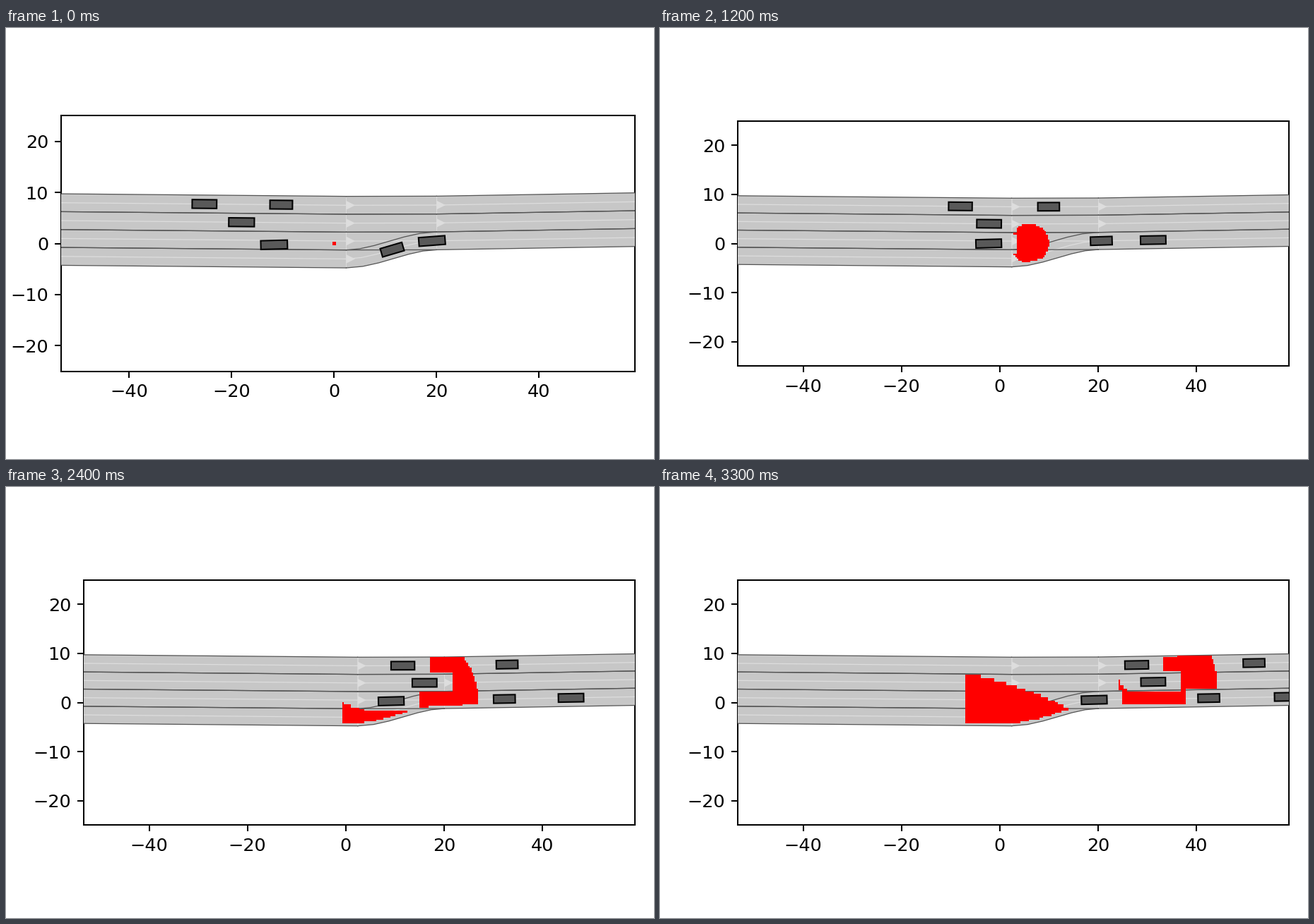
A matplotlib script for the animation above (3400 ms loop, 917 px wide and 611 px high).

```python
import numpy as np
import matplotlib.pyplot as plt
from matplotlib.animation import FuncAnimation
from matplotlib.colors import ListedColormap
from matplotlib.patches import Polygon

W, H, DPI = 917, 611, 128
PT = 183.4 / DPI           # drawn size of one point
FRAMES, STEP = 34, 100
LANE = 3.5
FORK, JOIN = 2.4, 20.05    # where the ramp leaves and meets the road
FIRST_BOX = (78, 124.4, 890, 486.6)
BOX = (110, 131.55, 890, 479.45)

plt.rcParams.update({
    "font.family": "DejaVu Sans", "font.size": 10 * PT,
    "axes.linewidth": 0.8 * PT,
})
for tick in ("xtick", "ytick"):
    plt.rcParams.update({
        f"{tick}.major.size": 3.5 * PT, f"{tick}.major.pad": 3.5 * PT,
        f"{tick}.major.width": 0.8 * PT,
    })

fig = plt.figure(figsize=(W / DPI, H / DPI), dpi=DPI, facecolor="white")
ax = fig.add_axes([0.1, 0.2, 0.8, 0.6])


# ---- road ----
def edge(x, i):
    """Height of the i-th lane border, counted from the top."""
    top = np.interp(x, [-60, FORK, JOIN, 65], [9.79, 9.23, 9.27, 10.02])
    return top - LANE * i


def ramp(x):
    """Centre of the lowest lane, which rises by one lane and merges."""
    t = np.clip((x - FORK) / (JOIN - FORK), 0, 1)
    return edge(x, 3.5) + LANE * t * t * (3 - 2 * t)


def lanelet(x, y, slope):
    mid = np.column_stack([x, y])
    normal = np.column_stack([-slope, np.ones_like(x)])
    normal /= np.hypot(*normal.T)[:, None]
    left, right = mid + normal * LANE / 2, mid - normal * LANE / 2
    ax.add_patch(Polygon(np.vstack([left, right[::-1]]), fc="#c7c7c7",
                         ec="none", lw=0, zorder=10))
    ax.plot(*mid.T, color="#dddddd", lw=0.5 * PT, zorder=11)
    ax.plot(*np.array([left[0], right[0]]).T, color="#dddddd",
            lw=0.25 * PT, zorder=11)
    side = normal[0] * LANE / 4
    ahead = np.array([normal[0][1], -normal[0][0]]) * LANE / 2
    ax.add_patch(Polygon([mid[0] + side, mid[0] - side, mid[0] + ahead],
                         fc="#dddddd", ec="none", lw=0, zorder=11))
    for bound in (left, right):
        ax.plot(*bound.T, color="#555555", lw=0.5 * PT, zorder=12)


for x0, x1, count in ((-60, FORK, 4), (FORK, JOIN, 3), (JOIN, 65, 3)):
    xs = np.array([x0, x1])
    for i in range(count):
        lanelet(xs, edge(xs, i + 0.5), np.zeros(2))

xs = np.linspace(FORK, JOIN, 7)
t = (xs - FORK) / (JOIN - FORK)
lanelet(xs, ramp(xs), 6 * t * (1 - t) * LANE / (JOIN - FORK))


# ---- cars ----
class Car:
    def __init__(self, path, length, x, speed, accel):
        self.path, self.length = path, length
        self.motion = np.poly1d([accel / 2, speed, x])
        self.body = ax.add_patch(Polygon(
            np.zeros((4, 2)), fc="#595959", ec="black", lw=0.8 * PT,
            joinstyle="miter", zorder=20))

    def place(self, t):
        x, half = self.motion(t), self.length / 2
        rise = self.path(x + half) - self.path(x - half)
        a = np.arctan2(rise, self.length)
        box = np.array([[-1, -1], [1, -1], [1, 1], [-1, 1]]) * [half, 0.85]
        turn = np.array([[np.cos(a), np.sin(a)], [-np.sin(a), np.cos(a)]])
        self.body.set_xy(box @ turn + [x, self.path(x)])

    def blocks(self, x, y, t):
        cx = self.motion(t)
        return ((x > cx - self.length / 2 - 2.7) & (x < cx + self.length / 2 + 3.1)
                & (abs(y - self.path(cx)) < 1.92))


def lane(i):
    return lambda x: edge(x, i + 0.5)


CARS = [
    Car(lane(0), 4.8, -25.3, 13.43, 1.62),
    Car(lane(0), 4.4, -10.3, 15.75, 1.84),
    Car(lane(1), 5.0, -18.05, 12.25, 1.62),
    Car(lambda x: 0.045 + 0.025 * x, 5.2, -11.69, 7.0, 1.43),
    Car(ramp, 4.4, 11.38, 6.74, 1.63),
    Car(ramp, 5.15, 19.15, 8.97, 1.78),
]


# ---- reachable area ----
# A disc drifts and grows with time. Its cells live on a grid scaled to the
# disc: cars and road borders erase them, neighbours above and below refill them.
N = 401
CELL = 0.35
REFILL = 5.5               # vertical speed of the refill
U, V = np.meshgrid(np.linspace(-1, 1, N), np.linspace(-1, 1, N))
DISC = U**2 + V**2 <= 1


def disc(t):
    return 5 * t + 0.05 * t * t, 0.35 + 2.5 * t * t


def is_free(x, y, t):
    ok = (y < edge(x, 0) - 0.3) & (y > ramp(x) - LANE / 2 + 0.65)
    for car in CARS:
        ok &= ~car.blocks(x, y, t)
    return ok


def spread(mask, w):
    """Grow the mask by w cells up and down."""
    total = np.cumsum(np.pad(mask, ((w + 1, w), (0, 0))), axis=0)
    return total[2 * w + 1:] - total[:-2 * w - 1] > 0


col = np.arange(-40, 140)
row = np.arange(-15, 29)
GX, GY = np.meshgrid((col + 0.5) * CELL, (row + 0.5) * CELL)


def to_world(mask, t):
    cx, r = disc(t)
    half = N // 2
    i = np.rint((GX - cx) / r * half).astype(int) + half
    j = np.rint(GY / r * half).astype(int) + half
    inside = (i >= 0) & (i < N) & (j >= 0) & (j < N)
    return inside & mask[np.clip(j, 0, N - 1), np.clip(i, 0, N - 1)]


def grow():
    mask = DISC
    for n in range(FRAMES):
        t = n * STEP / 1000
        cx, r = disc(t)
        w = min(N, round(REFILL * STEP / 1000 / r * (N // 2)))
        mask = spread(mask, w) & DISC & is_free(cx + U * r, V * r, t)
        yield to_world(mask, t)


AREAS = [np.ma.masked_equal(m.astype(int), 0) for m in grow()]
area = ax.imshow(AREAS[0], cmap=ListedColormap(["red"]), origin="lower",
                 interpolation="nearest", aspect="auto", zorder=15,
                 extent=(col[0] * CELL, (col[-1] + 1) * CELL,
                         row[0] * CELL, (row[-1] + 1) * CELL))
ax.set(xlim=(-53.3, 58.8), ylim=(-25, 25),
       xticks=range(-40, 41, 20), yticks=range(-20, 21, 10))


def draw(n):
    x0, y0, x1, y1 = BOX if n else FIRST_BOX
    ax.set_position([x0 / W, 1 - y1 / H, (x1 - x0) / W, (y1 - y0) / H])
    for car in CARS:
        car.place(n * STEP / 1000)
    area.set_data(AREAS[n])
    return [area]


anim = FuncAnimation(fig, draw, frames=FRAMES, interval=STEP, repeat=True,
                     repeat_delay=0, blit=False)
plt.show()
```
